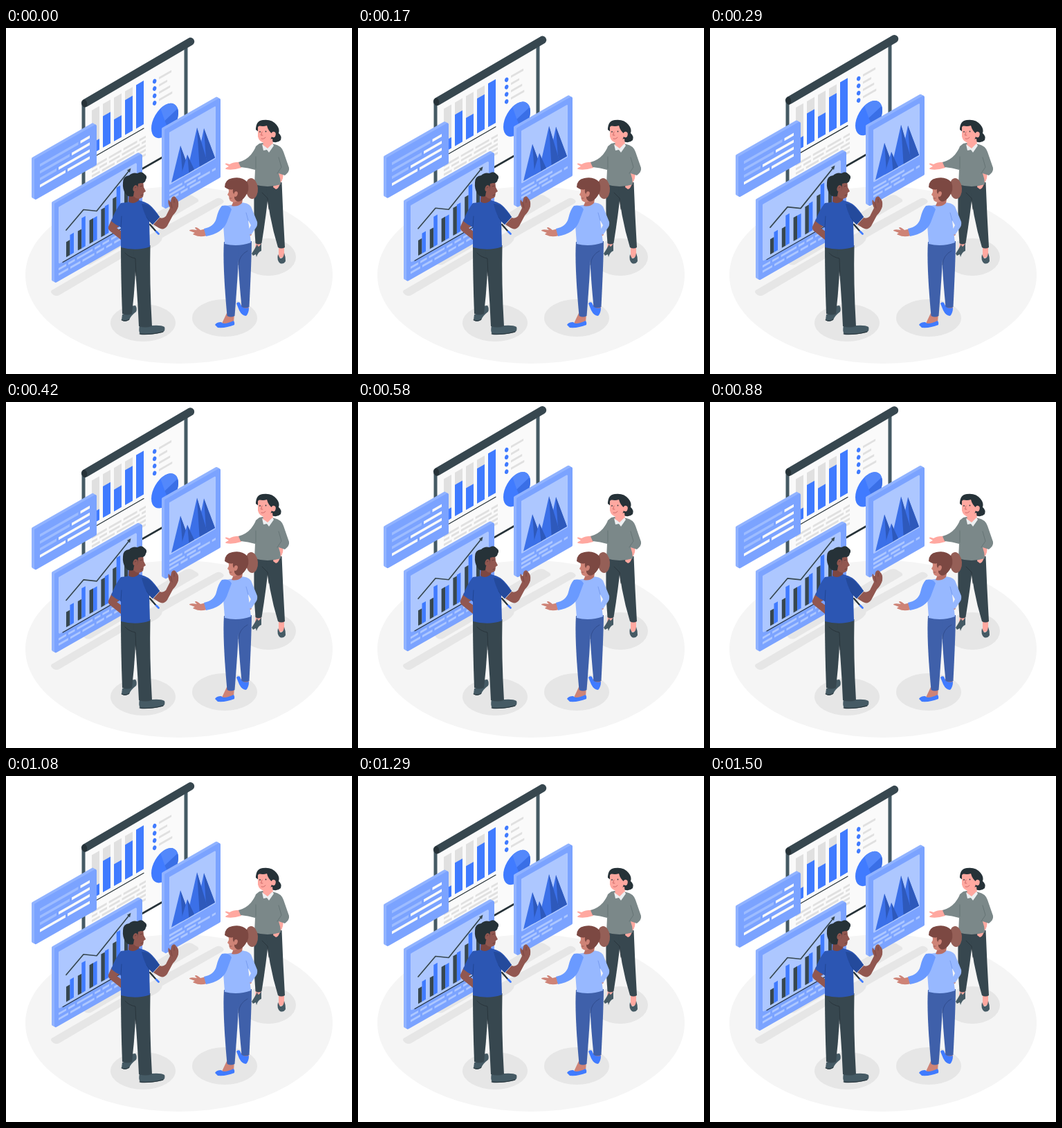
Write an HTML page with a canvas that moves like this. It is 500 px wide and 500 px high and loops after 1540 ms.

```html
<!DOCTYPE html>
<html lang="en">
<head>
<meta charset="utf-8">
<title>Team presentation</title>
<style>
html, body { margin: 0; width: 100%; height: 100%; overflow: hidden; background: #fff; }
canvas { display: block; width: 500px; height: 500px; }
</style>
</head>
<body>
<canvas id="stage"></canvas>
<script>
const canvas = document.getElementById('stage');
const ctx = canvas.getContext('2d');
const ratio = window.devicePixelRatio || 1;
canvas.width = canvas.height = 500 * ratio;

const SLOPE = 0.572;
const BLUE = '#407bff', NAVY = '#2e59bb', DARK = '#37474f', SLATE = '#455a64', INK = '#263238';
const GREY = '#e0e0e0', SHADOW = '#e6e6e6';
const FACE = '#7ba3ff', SIDE = '#91b3ff', PALE = '#adc7ff', WHITE = '#fafafa';
const LOOP = 1540, PERIOD = 1500, FPS = 24, LIFT = 10, PHASE = 30;

const random = seed => {
  const s = Math.sin(seed * 12.9898) * 43758.5453;
  return s - Math.floor(s);
};

function fill(color, d) {
  ctx.fillStyle = color;
  ctx.fill(new Path2D(d));
}

function line(color, width, d) {
  ctx.strokeStyle = color;
  ctx.lineWidth = width;
  ctx.lineCap = ctx.lineJoin = 'round';
  ctx.stroke(new Path2D(d));
}

function oval(color, x, y, rx, ry, turn = 0) {
  ctx.fillStyle = color;
  ctx.beginPath();
  ctx.ellipse(x, y, rx, ry, turn, 0, 7);
  ctx.fill();
}

// Upright isometric rectangle; (x, y) is its top left corner.
function slab(color, x, y, w, h, round = 0) {
  const l = x + round, r = x + w - round;
  const top = px => y - SLOPE * (px - x);
  const d = `M${l} ${top(l) + round}L${r} ${top(r) + round}V${top(r) + h - round}L${l} ${top(l) + h - round}Z`;
  fill(color, d);
  if (round) line(color, round * 2, d);
}

// One row of made-up words.
function words(color, x, y, width, seed) {
  const end = x + width;
  for (let a = x; a < end - 4;) {
    const b = Math.min(end, a + 8 + 18 * random(seed++));
    slab(color, a, y - SLOPE * (a - x), b - a, 3.2);
    a = b + 3;
  }
}

function board(x, y, w, h) {
  for (let i = 4; i > 0; i--) slab(SIDE, x - i, y - i * 0.55, w, h, 2);
  slab(FACE, x, y, w, h, 2);
}

// Trouser leg curving through hip, knee and ankle, each [centre x, y, width].
function leg(color, hip, knee, ankle) {
  const edge = (p, side) => [p[0] + side * p[2] / 2, p[1]];
  const bend = side => {
    const [a, k, b] = [hip, knee, ankle].map(p => edge(p, side));
    return k.map((v, i) => 2 * v - (a[i] + b[i]) / 2);
  };
  fill(color, `M${edge(hip, -1)}Q${bend(-1)} ${edge(ankle, -1)}Q${ankle[0]} ${ankle[1] + 3} ${edge(ankle, 1)}Q${bend(1)} ${edge(hip, 1)}Z`);
}

function floor() {
  oval('#f5f5f5', 250, 357, 222, 128);
  fill(SHADOW, 'M66 379L190 307Q196 304 201 307L204 311L77 386Q73 388 69 386Q63 382 66 379Z');
  fill(SHADOW, 'M107 333L258 243Q264 240 269 242L277 247Q280 250 276 252L124 341Q119 344 114 341Z');
  fill(SHADOW, 'M200 303L303 247Q308 244 313 248Q317 251 312 254L226 303Q225 311 210 318L200 321Z');
  oval(SHADOW, 198, 426, 47, 27);
  oval(SHADOW, 316, 419, 47, 27);
  oval(SHADOW, 379, 331, 40, 27);
}

function pie() {
  const slice = (color, from, to) => {
    ctx.fillStyle = color;
    ctx.beginPath();
    ctx.moveTo(0, 0);
    ctx.arc(0, 0, 22.5, from, to);
    ctx.fill();
  };
  ctx.save();
  ctx.transform(0.866, -0.5, 0, 1, 229.5, 134);
  slice(BLUE, 0, 7);
  slice('#5388fb', -1.9, -0.3);
  slice('#3a6fe6', -0.3, 1.2);
  ctx.restore();
}

function screen() {
  slab(SLATE, 109.5, 110, 153, 140);
  slab(INK, 109.5, 250, 153, 5);
  slab(WHITE, 114.5, 112, 143, 137);

  [0.25, 0.72, 0.5, 0.8, 1].forEach((level, i) => {
    const x = 124 + 16 * i, top = 119 - 16 * SLOPE * i, height = 63;
    slab(GREY, x, top, 11, height);
    slab(BLUE, x, top + height * (1 - level), 11, height * level);
  });
  line(INK, 1.2, 'M125 187.5L199 145');

  for (let i = 0; i < 4; i++) {
    oval(BLUE, 214.7, 77 + i * 10.5, 2.6, 3.4, 0.3);
    words(GREY, 221, 71 + i * 10.5, 19 - 7 * Math.sin(1.6 * i), 3 + i);
  }
  pie();
  for (let i = 0; i < 5; i++) words(GREY, 124, 200 + i * 6.4, 78, 20 + i * 7);

  line(DARK, 11.5, 'M114.5 108.5L266.5 19.6');
  oval(INK, 113.5, 109, 3.7, 5.6, -0.15);
}

function textBoard() {
  const left = 49, right = 121;
  board(41, 190, 90, 59);
  [106, 93.5, 74.5, 87.5].forEach((split, i) => {
    const y = 196.5 + 10 * i;
    slab(i < 3 ? '#9dbcff' : WHITE, left, y, split - left - 1.5, 4);
    slab(WHITE, split + 1.5, y - SLOPE * (split + 1.5 - left), right - split - 1.5, 4);
  });
}

function chartBoard() {
  board(70, 254, 127, 115);
  slab(PALE, 76, 259, 113, 82, 1.5);
  const bar = (color, x, h) => slab(color, x, 334 - SLOPE * (x - 82) - h, 5.5, h);
  for (let i = 0; i < 6; i++) {
    const x = 87 + 16.8 * i;
    bar(DARK, x, 22 + 6 * i);
    bar(BLUE, x + 5.5, 30 + 5 * i + 9 * Math.sin(2 * i - 0.1));
  }
  line(INK, 1.1, 'M82 338.5L189 277.3');
  line(DARK, 1.7, 'M87 292L112 262.5L131 264.5L178 206');
  fill(DARK, 'M180.5 202.5L175 205.5L179 209Z');
  for (let i = 0; i < 2; i++) words(PALE, 76, 347 + 7.5 * i, 89, 60 + 9 * i);
}

function peak(x, y, left, width) {
  const foot = px => 223.5 - SLOPE * (px - 239);
  const right = left + width, ridge = x + width * 0.12;
  fill('#3b70e8', `M${x} ${y}L${left} ${foot(left)}L${right} ${foot(right)}Z`);
  fill(NAVY, `M${x} ${y}L${ridge} ${foot(ridge)}L${right} ${foot(right)}Z`);
}

function peakBoard() {
  board(229, 147, 81, 115);
  slab(PALE, 236, 151, 67, 76, 1);
  peak(286, 145, 274, 28);
  peak(276, 144, 261, 30);
  peak(252, 170, 239, 27);
  peak(262, 183, 252, 20);
  for (let i = 0; i < 3; i++) words(PALE, 236, 234 + 6 * i, 67 - 22 * Math.abs(i - 1), 40 + 5 * i);
}

function standingWoman() {
  const skin = '#ffa8a0', trousers = DARK;
  // Shoes and legs
  fill(skin, 'M361 309L369 309L368 320L359 326ZM394 315L402 315L402 331L394 333Z');
  fill(SLATE, 'M355 326Q361 317 363 312Q364 320 369 311L369 322Q364 324 362 331L361 327L357 329Z');
  fill(SLATE, 'M393 327Q391 336 396 340Q401 342 404 337Q404 330 402 325Q401 334 396 333Z');
  leg(trousers, [370, 224, 22], [367, 270, 17], [365, 311, 9]);
  leg(trousers, [387, 223, 23], [391, 270, 19], [398, 317, 10]);
  line(INK, 0.8, 'M380 262L378 246L370 238');
  // Arms and sweater
  fill(skin, 'M340 194Q330 193 323 197Q316 194 317 197L322 200Q315 203 318 204Q327 206 340 202Z');
  fill(skin, 'M400 208Q402 218 396 225Q394 232 390 233L386 230L387 225Q384 226 385 222Q391 217 393 209Z');
  fill('#7b8889', 'M366 167Q377 164 388 168Q398 170 401 179L409 202Q410 208 403 213L394 210Q397 218 397 226Q378 232 359 226L360 205Q350 202 339 201L336 194Q347 191 354 183Q360 175 361 171Z');
  line('#667475', 1, 'M394 187L398 201L392 210M361 186L361 203');
  // Head
  fill(INK, 'M361 147Q361 134 371 133Q384 131 391 140Q396 146 394 152Q399 156 397 162Q391 168 382 163Z');
  fill(skin, 'M372 163L385 160L386 169L379 177L371 171Z');
  fill('#eceff1', 'M370 168L378 174L385 167L387 170L380 180L377 176L372 177Z');
  fill(skin, 'M364 142L378 139Q380 149 385 152Q383 166 374 166Q366 165 364 157Z');
  fill(INK, 'M361 147Q364 134 379 136Q389 142 385 153Q379 149 377 141Q371 143 366 141Q364 143 361 147Z');
  oval(skin, 386.5, 154, 3.2, 4.2, 0.2);
  oval(INK, 367, 150, 0.8, 1.1);
  oval(INK, 375.5, 149.5, 0.8, 1.1);
  line('#c45c5c', 0.8, 'M370 150L368.5 155L371 155M369 160Q373 161 375 158');
}

function bunWoman() {
  const skin = '#ce8376', hair = '#7c4842', trousers = '#3f60aa';
  // Shoes and legs
  fill(skin, 'M319 412L330 412L329 426L311 429ZM340 400L351 400L350 410L339 409Z');
  fill(BLUE, 'M302 429Q304 425 311 425Q314 430 329 423Q331 426 330 429Q318 434 306 433Z');
  fill(BLUE, 'M333 398Q335 395 338 397Q342 408 351 404Q351 412 347 416Q341 416 337 408Z');
  leg(trousers, [345, 308, 20], [345, 347, 18], [346, 403, 11]);
  leg(trousers, [326, 309, 22], [325, 352, 20], [325, 416, 11]);
  line('#304b8b', 0.9, 'M336 342Q337 328 349 322');
  // Arms and shirt
  fill(skin, 'M289 290L281 292Q274 286 273 289L276 292Q265 290 265 293L273 296Q268 298 272 299Q280 303 290 300ZM355 291L349 296L349 303L355 299Z');
  fill('#97b8ff', 'M312 257Q327 257 337 252Q350 252 354 258L363 280Q364 285 361 289L354 299L349 295L354 285L350 278L354 310Q335 317 316 312Z');
  fill('#6a9aff', 'M312 257Q322 255 326 262L319 281Q312 297 289 301L286 290Q301 287 304 275Q307 262 312 257Z');
  line('#7398ec', 0.9, 'M350 278L347 267');
  // Head
  oval('#955f57', 355, 232, 9, 15, -0.08);
  fill('#b86f65', 'M328 240L343 242L341 253Q335 259 326 257L329 250Z');
  fill(skin, 'M321 226Q335 223 341 235L337 249L330 252Q324 251 323 248L322 243L320 241L322 237Z');
  fill(hair, 'M316 230Q316 219 327 217Q341 214 349 223Q353 234 346 243Q339 253 333 250Q328 246 331 242Q327 239 328 233Q323 235 316 230Z');
  oval(skin, 332, 240, 2.7, 4, 0.3);
  line('#8c504a', 0.7, 'M323 246L326 246');
}

function man() {
  const skin = '#915750', shirt = '#2c56b3';
  // Shoes and legs
  fill(SLATE, 'M168 414Q175 415 180 402L187 401Q190 405 188 410Q180 416 178 422Q171 426 167 422Z');
  fill(SLATE, 'M193 430Q205 433 211 430Q224 429 229 432Q231 437 226 440Q208 444 194 443Q191 437 193 430Z');
  line(INK, 1, 'M167 422Q173 425 178 421M193 442Q209 444 227 439');
  leg(DARK, [177, 314, 22], [176.5, 362, 20], [175, 413, 14]);
  leg(DARK, [196, 314, 25], [198.5, 370, 20], [201.5, 431, 19]);
  line(INK, 0.8, 'M188 358L187 333Q177 331 172 325');
  // Left arm
  fill(skin, 'M153 276L148 287Q147 291 151 294L166 306L167 294L160 289L168 284Z');
  // Pen and right arm
  line(INK, 2.3, 'M208 284L216 293');
  line(BLUE, 2.8, 'M217 294L220.5 297.5');
  fill(skin, 'M213 284L222 274Q227 276 231 272L237 260Q233 252 235 248L238 252Q239 244 241 244Q244 242 246 246Q250 249 249 258Q247 265 241 271L233 286Q228 293 221 289Z');
  line('#71403d', 0.7, 'M238 252L240 260M243 247L243 252');
  // Shirt
  fill(shirt, 'M166 253Q179 252 189 248Q202 251 208 256Q215 262 222 273L212 284L207 279L208 316Q189 323 166 317L166 288Q159 285 152 279Q158 263 166 253Z');
  fill('#244a9c', 'M196 254Q207 254 212 262L222 273L212 284Q201 276 196 254Z');
  line('#20438f', 0.9, 'M166 288L167 272M207 279L203 273');
  // Head
  fill('#7d4742', 'M178 235L194 240L192 249Q184 256 177 251Z');
  fill(skin, 'M183 225L198 220L199 230L202 236L199 238L198 244Q194 248 188 246L180 240Z');
  fill(INK, 'M169 223Q169 214 178 213Q183 208 190 210Q196 206 200 211Q205 214 202 219Q201 225 195 224L191 225L190 234L185 237L184 243Q177 245 173 240Q168 233 169 223Z');
  oval(skin, 187, 232, 3.5, 5, 0.25);
  line('#633936', 0.8, 'M194 229L197 228M195 242L198 241M186 231L188 230');
}

// Linear rise and fall, held for each step of the frame rate.
function floatHeight(ms) {
  const step = Math.floor((ms + 4) * FPS / 1000);
  const phase = (step * 1000 / FPS + PHASE) % PERIOD / PERIOD;
  return LIFT * (1 - Math.abs(2 * phase - 1));
}

const startHeight = floatHeight(0);

function draw(ms) {
  ctx.setTransform(ratio, 0, 0, ratio, 0, 0);
  ctx.fillStyle = '#fff';
  ctx.fillRect(0, 0, 500, 500);
  floor();
  ctx.save();
  ctx.translate(0, startHeight - floatHeight(ms));
  screen();
  textBoard();
  chartBoard();
  peakBoard();
  ctx.restore();
  standingWoman();
  bunWoman();
  man();
}

const start = performance.now();

function tick() {
  draw((performance.now() - start) % LOOP);
  requestAnimationFrame(tick);
}
tick();
</script>
</body>
</html>
```
